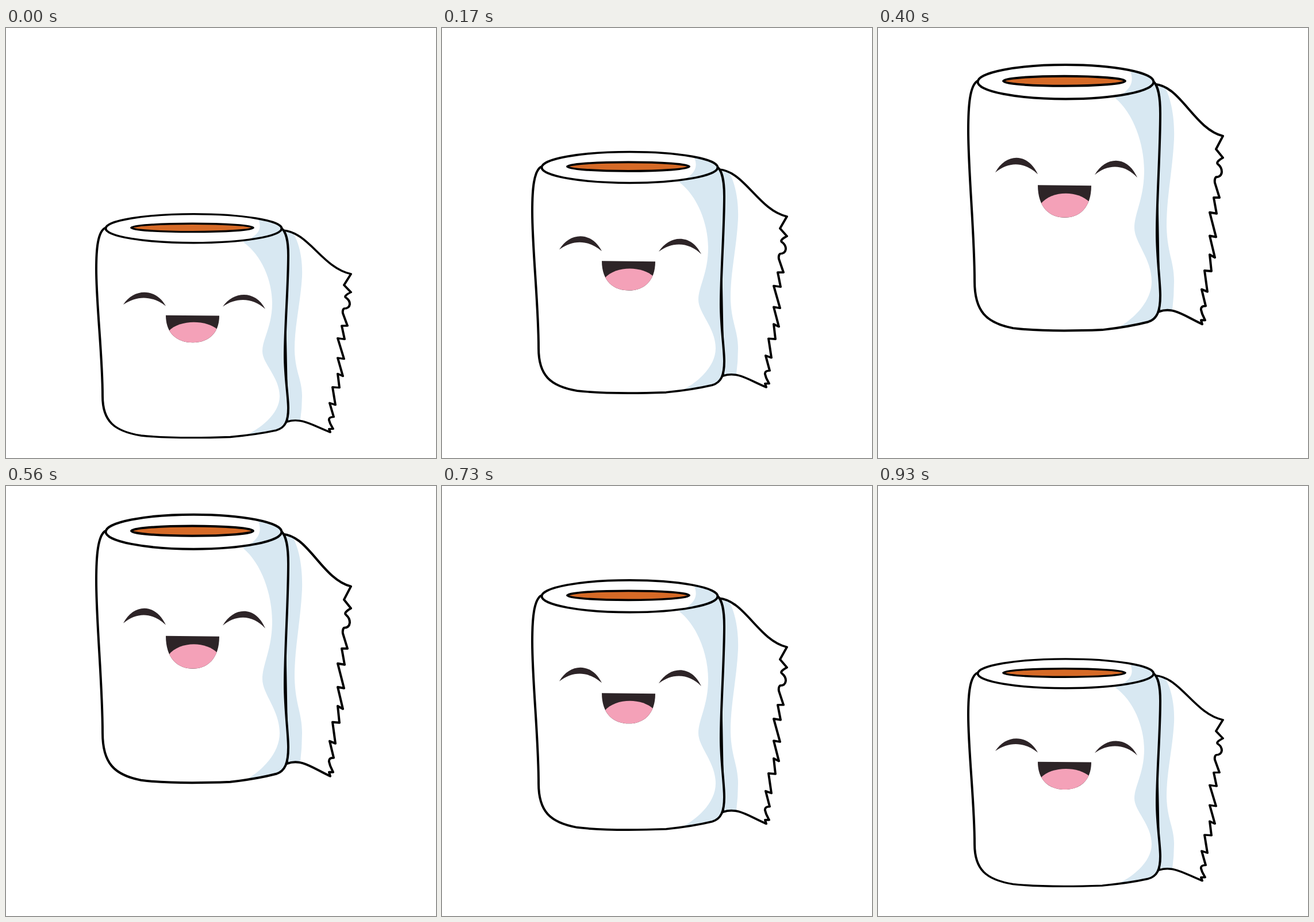
An HTML page for the animation above (0.97 s loop, 748 px wide and 748 px high).

```html
<!DOCTYPE html>
<html lang="en">
<head>
<meta charset="utf-8">
<title>Jumping paper roll</title>
<style>
  html, body { margin: 0; width: 100%; height: 100%; overflow: hidden; background: #fff; }
  svg { display: block; width: 100%; height: 100%; }
  .line { fill: none; stroke: #000; stroke-width: 4; stroke-linejoin: round; }
  .paper { fill: #fff; }
  .shade { fill: #d8e8f2; }
  .dark { fill: #2d2427; }
</style>
</head>
<body>
<svg viewBox="0 0 748 748">
  <defs>
    <path id="flap" d="M482 84 C527 88 550 162 600 175 L588 198 600 213 Q586 221 592 225 Q598 230 598 238
      Q597 247 588 247 Q585 250 586 257 L594 283 584 283 589 311 577 309 588 352 577 350 586 388 577 383
      580 412 568 411 573 448 563 444 570 473 Q561 473 562 480 L564 487 569 498 562 498 564 505
      C532 490 514 474 489 483 Z"/>
    <path id="body" d="M172 79 C160 88 157 120 157 165 C157 240 168 345 168 430 C168 482 188 503 235 512
      C275 517 340 517 390 515 C425 511 447 507 470 501 C486 496 491 481 491 455 C491 430 485 390 485 345
      C485 285 491 200 491 136 C491 103 487 87 479 79 Z"/>
    <ellipse id="rim" cx="326.5" cy="80" rx="153" ry="30"/>
    <path id="mouth" d="M278 261 L371 262 C371 301 350 318 325 318 C299 318 278 301 278 261 Z"/>
    <clipPath id="inBody"><use href="#body"/></clipPath>
    <clipPath id="inRim"><use href="#rim"/></clipPath>
    <clipPath id="inMouth"><use href="#mouth"/></clipPath>
  </defs>
  <g id="roll">
    <use href="#flap" class="paper"/>
    <path class="shade" d="M484 86 L500 91 C512 115 516 150 515 180 C512 240 502 280 502 333
      C503 380 515 395 515 430 Q515 455 512 480 L487 482 Z"/>
    <use href="#flap" class="line"/>

    <use href="#body" class="paper"/>
    <path class="shade" clip-path="url(#inBody)" d="M412 108 C445 135 463 190 463 235 C463 285 446 310 446 336
      C446 362 476 390 476 430 C476 468 440 500 414 513 L495 520 V70 Z"/>
    <use href="#body" class="line"/>

    <use href="#rim" class="paper"/>
    <path class="shade" clip-path="url(#inRim)" d="M434 50 C447 75 446 92 410 110 H490 V50 Z"/>
    <use href="#rim" class="line"/>
    <ellipse class="line" cx="324" cy="78.5" rx="106" ry="8.6" style="fill:#d66a27"/>

    <path class="dark" d="M204 239 C222 205 260 203 278 242 C255 220 228 219 204 239 Z"/>
    <path class="dark" d="M377 243 C396 210 434 208 451 248 C430 224 400 223 377 243 Z"/>
    <use href="#mouth" class="dark"/>
    <path clip-path="url(#inMouth)" fill="#f4a1b8" d="M283 294 C302 270 348 270 368 291 V320 H283 Z"/>
  </g>
</svg>
<script>
  const LOOP = 970, STEPS = 29, PEAK = 14.89;
  const TOP = 48, HEIGHT = 470; // extent of the roll as drawn
  const roll = document.getElementById('roll');

  function draw(now) {
    const step = Math.min(STEPS - 1, Math.floor((now % LOOP + 7) * 0.03));
    const lift = step < PEAK ? step / PEAK : (STEPS - step) / (STEPS - PEAK);
    const top = 322 - 322.6 * lift;
    const bottom = 714 - 230.7 * lift;
    const stretch = (bottom - top) / HEIGHT;
    roll.setAttribute('transform', `translate(0 ${top - TOP * stretch}) scale(1 ${stretch})`);
  }

  const start = performance.now();
  function tick() {
    draw(performance.now() - start);
    requestAnimationFrame(tick);
  }
  tick();
</script>
</body>
</html>
```
